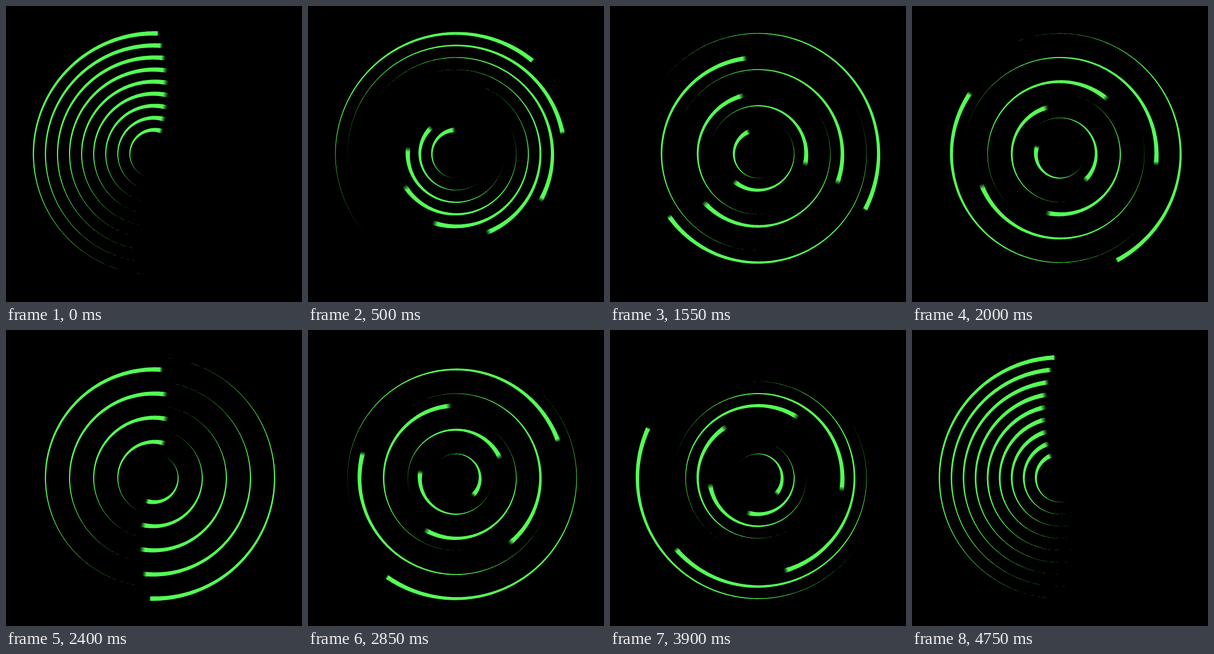
An HTML page for the animation above (4800 ms loop, 540 by 540 pixels).

```html
<!DOCTYPE html>
<html lang="en">
<head>
<meta charset="utf-8">
<title>Orbiting arcs</title>
<style>
  html, body { margin: 0; width: 100%; height: 100%; overflow: hidden; background: #000; }
  svg { display: block; width: 100%; height: 100%; }
</style>
</head>
<body>
<svg id="stage" viewBox="0 0 540 540"></svg>
<script>
const NS = "http://www.w3.org/2000/svg";
const RINGS = 9, GAP = 22, OUTER = 220;
const WIDTH = 8, SPAN = 180, TAPER = 1.8;
const LOOP = 4800, TICK = 20;
const STEP = 360 * TICK / LOOP;      // degrees per tick for the slowest ring
const SAMPLES = 5, SHUTTER = 0.6;    // motion blur at the head

const stage = document.getElementById("stage");

function add(parent, tag, attrs) {
  const el = document.createElementNS(NS, tag);
  for (const name in attrs) el.setAttribute(name, attrs[name]);
  return parent.appendChild(el);
}

const green = f => `rgb(${[85, 255, 85].map(c => Math.round(c * f))})`;

// Angles run clockwise from the top.
function point(r, deg) {
  const a = deg * Math.PI / 180;
  return (r * Math.sin(a)).toFixed(3) + " " + (-r * Math.cos(a)).toFixed(3);
}

function band(r, from, to, steps, width) {
  const out = [], back = [];
  for (let n = 0; n <= steps; n++) {
    const p = n / steps, deg = from + (to - from) * p, w = width(p) / 2;
    out.push(point(r + w, deg));
    back.unshift(point(r - w, deg));
  }
  return "M" + out.concat(back).join("L") + "Z";
}

function makeRing(turns) {
  const r = OUTER - GAP * (turns - 1);
  const g = add(stage, "g", {});
  for (let s = SAMPLES - 1; s > 0; s--) {
    const end = STEP * turns * SHUTTER * s / SAMPLES;
    add(g, "path", { d: band(r, -0.5, end, 8, () => WIDTH), fill: green(1 - s / SAMPLES) });
  }
  const taper = p => WIDTH * Math.pow(p, TAPER);
  add(g, "path", { d: band(r, -SPAN, 0, 180, taper), fill: green(1) });
  return g;
}

const rings = Array.from({ length: RINGS }, (_, i) => makeRing(i + 1));

function draw(ms) {
  const tick = Math.floor((ms % LOOP + TICK / 4) / TICK) + 1;
  rings.forEach((g, i) => {
    const deg = STEP * tick * (i + 1) % 360;
    g.setAttribute("transform", `translate(270 270) rotate(${deg})`);
  });
}

const start = performance.now();
function loop() {
  draw(performance.now() - start);
  requestAnimationFrame(loop);
}
loop();
</script>
</body>
</html>
```
